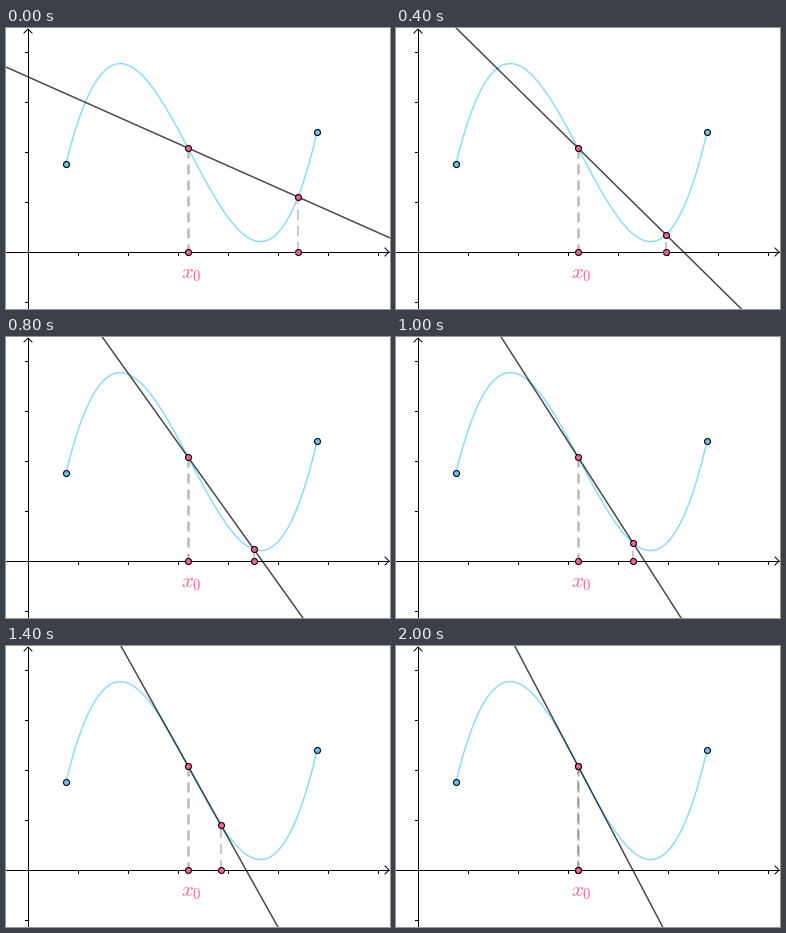
Write a matplotlib script that moves like this. It is 384 px wide and 281 px high and loops after 2.1 s.

```python
import numpy as np
import matplotlib.pyplot as plt
from matplotlib.animation import FuncAnimation

W, H, DPI = 384, 281, 64      # 64 divides exactly into the stage size
PT = 72 / DPI                 # points per pixel
FRAMES, STEP_MS = 21, 100
OX, OY, UNIT = 22, 224, 50    # axes origin and tick spacing
X0, SPAN = 182, 110           # fixed abscissa and widest secant
PINK, BLUE, GREY = "#ff5f95", "#68c4f4", "#7d7d7d"

plt.rcParams["mathtext.fontset"] = "cm"
plt.rcParams["lines.scale_dashes"] = False


def curve(x):
    """Cubic with its extrema at u = -1 and u = 1, in stage pixels."""
    u = (x - 184.4) / 70.2
    return 124.6 + 89 * (3 * u - u**3) / 2


def slope(x):
    u = (x - 184.4) / 70.2
    return 89 * 1.5 * (1 - u * u) / 70.2


fig = plt.figure(figsize=(W / DPI, H / DPI), dpi=DPI, facecolor="white")
ax = fig.add_axes([0, 0, 1, 1])
ax.set_xlim(0, W)
ax.set_ylim(H, 0)
ax.axis("off")


def stroke(xs, ys, color="black", width=1.0, z=1, **kw):
    return ax.plot(xs, ys, color=color, lw=width * PT, zorder=z, **kw)[0]


def dots(xs, ys, color, z=6):
    return ax.plot(xs, ys, "o", ms=6 * PT, mfc=color, mec="black",
                   mew=1.1 * PT, zorder=z)[0]


def dashed(x, y_from, y_to, width, alpha):
    return stroke([x, x], [y_from, y_to], GREY, width, 3, alpha=alpha,
                  dashes=(10 * PT, 6 * PT), dash_capstyle="butt")


# Axes with arrowheads and ticks
stroke([-1, W - 1], [OY, OY])
stroke([OX, OX], [1, H])
stroke([W - 5, W - 1, W - 5], [OY - 4, OY, OY + 4])
stroke([OX - 4, OX, OX + 4], [5, 1, 5])
for x in range(OX + UNIT, W, UNIT):
    stroke([x, x], [OY, OY + 3])
for y in range(OY % UNIT, H, UNIT):
    if y != OY:
        stroke([OX - 3, OX], [y, y])

# Curve, its end points and the fixed point
y0 = curve(X0)
ends = np.array([60, 311])
xs = np.linspace(*ends, 400)
stroke(xs, curve(xs), "#8fdafb", 1.5, 2)
dots(ends, curve(ends), BLUE)
dashed(X0, y0, OY, 2.6, 0.52)
dots([X0, X0], [y0, OY], PINK)
ax.text(175, 250, "$x_0$", color="#f7669a", fontsize=21 * PT,
        ha="left", va="baseline", zorder=5)

# Moving parts
secant = stroke([], [], "black", 1.5, 4, alpha=0.72)
drop = dashed(X0, OY, y0, 1.9, 0.45)
movers = dots([], [], PINK, 7)


def update(i):
    h = SPAN * (1 - i / (FRAMES - 1))
    x = X0 + h
    y = curve(x)
    m = (y - y0) / h if h > 1e-6 else slope(X0)
    edge = np.array([-5, W + 5])
    secant.set_data(edge, y0 + m * (edge - X0))
    drop.set_data([x, x], [OY, y])
    movers.set_data([x, x], [y, OY])
    return secant, drop, movers


anim = FuncAnimation(fig, update, frames=FRAMES, interval=STEP_MS,
                     repeat=True, repeat_delay=0)
plt.show()
```
